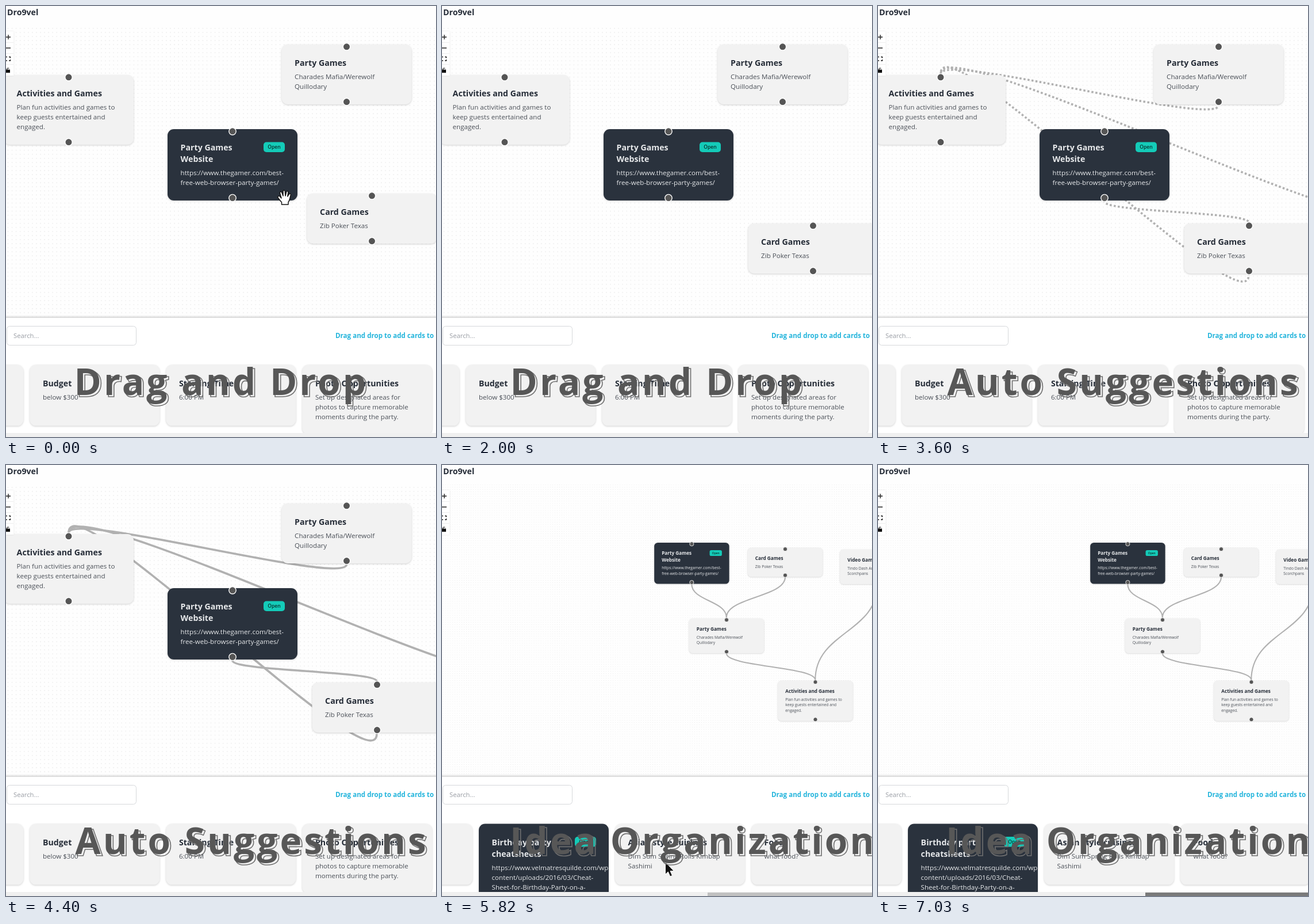
Recreate the animation shown at these times as an HTML page. Size 748 by 749 pixels, loop 7230 ms.

```html
<!DOCTYPE html>
<html lang="en">
<head>
<meta charset="utf-8">
<title>Card board</title>
<style>
  html, body { margin: 0; width: 100%; height: 100%; overflow: hidden; background: #fff; }
  svg { display: block; width: 748px; height: 749px; }
  text { font-family: "Open Sans", "Noto Sans", sans-serif; white-space: pre; }
  .title { font-size: 14.2px; font-weight: 700; fill: #262d38; }
  .body { font-size: 11.6px; fill: #4b5058; }
  .dark .title { fill: #e6e8ea; }
  .dark .body { fill: #e6e8ea; }
  .box { fill: #f2f2f2; filter: drop-shadow(0 1px 1.4px rgba(0, 0, 0, .18)); }
  .dark .box { fill: #2a323d; }
  .badge { font-size: 8.6px; font-weight: 600; fill: #07332f; text-anchor: middle; }
  .knob { fill: #555; stroke: #fff; stroke-width: 1.4; }
  .edge { fill: none; stroke: #b1b1b1; stroke-width: 3.6; }
  #far .edge { stroke-width: 2.1; }
  .caption { font-size: 64px; font-weight: 700; letter-spacing: 4px; }
</style>
</head>
<body>
<svg id="stage" viewBox="0 0 748 749"></svg>
<script>
const W = 226, ZOOM = 0.577, STEP = 7230 / 36;
const CUT1 = 13, CUT2 = 25, SOLID = 20;

const site = { title: ["Party Games", "Website"], dark: true,
  body: ["https://www.thegamer.com/best-", "free-web-browser-party-games/"] };
const party = { title: ["Party Games"], body: ["Charades Mafia/Werewolf", "Quillodary"] };
const acts = { title: ["Activities and Games"],
  body: ["Plan fun activities and games to", "keep guests entertained and", "engaged."] };
const cards = { title: ["Card Games"], body: ["Zib Poker Texas"] };
const video = { title: ["Video Games"], body: ["Tindo Dash Ants", "Scorchpans"] };

const blank = { title: [], body: [], h: 106 };
const trayOne = [blank,
  { title: ["Budget"], body: ["below $300"], h: 106 },
  { title: ["Starting Time"], body: ["6:00 PM"], h: 106 },
  { title: ["Photo Opportunities"],
    body: ["Set up designated areas for", "photos to capture memorable", "moments during the party."] }];
const trayTwo = [blank,
  { title: ["Birthday party", "cheatsheets"], dark: true, h: 160,
    body: ["https://www.velmatresquilde.com/wp-", "content/uploads/2016/03/Cheat-", "Sheet-for-Birthday-Party-on-a-"] },
  { title: ["Asian style cuisines"], body: ["Dim Sum Spring Rolls Kimbap", "Sashimi"], h: 106 },
  { title: ["Food"], body: ["what food?"], h: 106 }];

const height = c => c.h || 50 + 20 * c.title.length + 17 * c.body.length;
const lines = (list, cls, y, gap) =>
  list.map((s, i) => `<text class="${cls}" x="22.6" y="${y + i * gap}">${s}</text>`).join("");
const knob = y => `<circle class="knob" cx="${W / 2}" cy="${y}" r="6.2"/>`;

function card(c, x, y, { zoom = 1, knobs = true, id = "" } = {}) {
  const h = height(c);
  const badge = c.dark
    ? `<rect x="167" y="22.5" width="37" height="17.5" rx="5" fill="#14cbb8"/><text class="badge" x="185.5" y="34">Open</text>` : "";
  return `<g ${id && `id="${id}"`} class="${c.dark ? "dark" : ""}" transform="translate(${x} ${y}) scale(${zoom})">
    <rect class="box" width="${W}" height="${h}" rx="11"/>
    <g clip-path="url(#inCard)">${badge}${lines(c.title, "title", 37, 20)}${lines(c.body, "body", 40 + 20 * Math.max(1, c.title.length), 17)}</g>
    ${knobs ? knob(3.8) + knob(h - 4.4) : ""}</g>`;
}

// Vertical bezier from a bottom knob to a top knob; k is the board scale.
function edge(x0, y0, x1, y1, k) {
  const d = y1 - y0;
  const o = d >= 0 ? d / 2 : 6.25 * Math.sqrt(-d / k) * k;
  return `<path class="edge" d="M${x0} ${y0}C${x0} ${y0 + o} ${x1} ${y1 - o} ${x1} ${y1}"/>`;
}

const dots = (id, gap, r) =>
  `<pattern id="${id}" width="${gap}" height="${gap}" patternUnits="userSpaceOnUse"><circle cx="${gap / 2}" cy="${gap / 2}" r="${r}" fill="#d8d8d8"/></pattern>`;
const board = id => `<rect y="34" width="748" height="508" fill="url(#${id})"/>`;
const tray = (id, list) => `<g clip-path="url(#inTray)"><g id="${id}">` +
  list.map((c, i) => card(c, (i - 1) * 237, 623.6, { knobs: false })).join("") + `</g></g>`;
const caption = (id, s, x) => `<g id="${id}" class="caption">
  <text x="${x + 3.3}" y="679.3" fill="none" stroke="#707070" stroke-width="1.6">${s}</text>
  <text x="${x}" y="676" fill="#575757">${s}</text></g>`;
const small = { zoom: ZOOM };

document.getElementById("stage").innerHTML = `
<defs>
  ${dots("wide", 7.06, 0.6)}${dots("fine", 4.05, 0.4)}
  <clipPath id="inCard"><rect width="${W}" height="200"/></clipPath>
  <clipPath id="inTray"><rect y="600" width="748" height="142"/></clipPath>
  <linearGradient id="lip" x2="0" y2="1"><stop stop-color="#ddd" stop-opacity="0"/><stop offset="1" stop-color="#d4d4d4"/></linearGradient>
</defs>
<rect width="748" height="749" fill="#fefefe"/>
<g id="near">${board("wide")}
  <g id="links">
    ${edge(592.5, 172.5, 109, 118, 0.706)}
    ${edge(645, 467, 109, 118, 0.706)}
    ${edge(896, 355, 109, 118, 0.706)}
    ${edge(394, 340, 645, 376, 0.706)}
  </g>
  ${card(acts, -4, 120)}${card(party, 479.5, 67)}${card(site, 281, 214)}
  ${card(cards, 523.5, 326, { id: "moving" })}
</g>
<g id="far">${board("fine")}
  ${edge(434.3, 207, 494.8, 265)}
  ${edge(597, 194.5, 494.8, 265)}
  ${edge(494.8, 327.5, 649.3, 373.5)}
  ${edge(757.5, 207.5, 649.3, 373.5)}
  ${card(site, 369.2, 135, small)}${card(cards, 531.8, 144, small)}${card(video, 692.3, 147, small)}
  ${card(party, 429.8, 267, small)}${card(acts, 584.3, 375, small)}
</g>
<text class="title" x="2" y="16">Dro9vel</text>
<rect x="-4" y="44" width="17.5" height="77" fill="#fff" style="filter:drop-shadow(0 0 1px rgba(0,0,0,.12))"/>
<path d="M-4 63.5H13M-4 82.5H13M-4 101.5H13" stroke="#eee"/>
<path d="M0 54H8M4 50V58M0 73H8M-1 88V95M-1 88.5H2M-1 95H2M5 88.5H7.5V90.5M5 95H7.5V93" fill="none" stroke="#222" stroke-width="1.4"/>
<rect y="110.5" width="7" height="5.5" fill="#111"/>
<path d="M1.8 111V109Q3.5 106.5 5.2 109" fill="none" stroke="#111" stroke-width="1.2"/>
<rect y="537" width="748" height="5" fill="url(#lip)"/>
<rect y="542" width="748" height="207" fill="#fff"/>
<rect x="1.5" y="556.5" width="225" height="33" rx="5" fill="#fff" stroke="#d6d8db"/>
<text x="13" y="577" font-size="11.3" fill="#999da4">Search...</text>
<text x="573" y="577" font-size="11.6" font-weight="700" fill="#25b5dc">Drag and drop to add cards to</text>
${tray("trayOne", trayOne)}${tray("trayTwo", trayTwo)}
<rect y="742" width="748" height="7" fill="#f0f0f0"/>
<rect id="thumb" y="743" width="400" height="6"/>
<path id="hand" fill="#fff" stroke="#151515" stroke-width="1.5" stroke-linejoin="round"
  d="M8 26V22C5 19 3 16 1.5 14C.5 12 3 10.5 5 12L7.5 15L5 6C4.5 3.5 7.5 3 8.3 5L10.5 11V3C10.5 .5 13.5 .5 13.8 3L14.5 11L16.3 4C17 2 19.8 2.6 19.4 5L18.3 12L20.8 8C22 6.3 24.4 7.5 23.8 9.5C22.5 14 22 19 19.5 22V26Z"/>
<path id="arrow" fill="#111" stroke="#fff" stroke-width="1" d="M0 0V21.5L4.8 17L8.3 25L12 23.4L8.6 15.6H15Z"/>
${caption("cap0", "Drag and Drop", 118.5)}
${caption("cap1", "Auto Suggestions", 120.5)}
${caption("cap2", "Idea Organization", 118)}`;

const $ = id => document.getElementById(id);
const show = (id, on) => $(id).style.display = on ? "" : "none";
const move = (id, x, y) => $(id).setAttribute("transform", `translate(${x} ${y})`);

// Rows of [step, x, y]
const handPath = [[0, 484, 332], [1, 560, 348], [2, 600, 372], [3, 609, 403], [4, 722, 288], [5, 742, 157]];
const cardPath = [[0, 523.5, 326], [1, 523.5, 326], [2, 527, 346], [3, 532.5, 378]];
const arrowPath = [[25, 540, 480], [28, 400, 676], [29, 388.5, 690], [30, 396, 706], [32, 480, 752]];
const scrollPath = [[25, 64, 462], [30, 64, 462], [35, 52, 465]];

function at(path, n) {
  const i = path.findIndex(p => p[0] >= n);
  if (i < 0) return path[path.length - 1].slice(1);
  if (i === 0) return path[0].slice(1);
  const a = path[i - 1], b = path[i], k = (n - a[0]) / (b[0] - a[0]);
  return [1, 2].map(j => a[j] + (b[j] - a[j]) * k);
}

function draw(n) {
  const part = n < CUT1 ? 0 : n < CUT2 ? 1 : 2;
  for (let i = 0; i < 3; i++) show("cap" + i, i === part);
  for (const id of ["near", "trayOne"]) show(id, part < 2);
  for (const id of ["far", "trayTwo", "thumb"]) show(id, part === 2);
  show("links", part === 1);
  show("hand", n < 6);
  show("arrow", part === 2 && n < 32);

  const [hx, hy] = at(handPath, n);
  move("hand", hx - 12.5, hy - 13);
  move("moving", ...at(cardPath, n));
  move("arrow", ...at(arrowPath, n));
  move("trayOne", 41.3, 0);

  const links = $("links").style;
  links.strokeDasharray = n < SOLID ? "3.53" : "none";
  links.strokeDashoffset = -(n - CUT1) * 2.82 % 7.06;

  const [scroll, thumb] = at(scrollPath, n);
  move("trayTwo", scroll, 0);
  $("thumb").setAttribute("x", thumb);
  $("thumb").setAttribute("fill", n > 30 ? "#7a7a7a" : "#c1c1c1");
}

const start = performance.now();
let last = -1;
function tick() {
  const t = (performance.now() - start) % 7230;
  const n = Math.min(35, Math.floor((t + 8) / STEP));
  if (n !== last) draw(last = n);
  requestAnimationFrame(tick);
}
draw(0);
requestAnimationFrame(tick);
</script>
</body>
</html>
```
